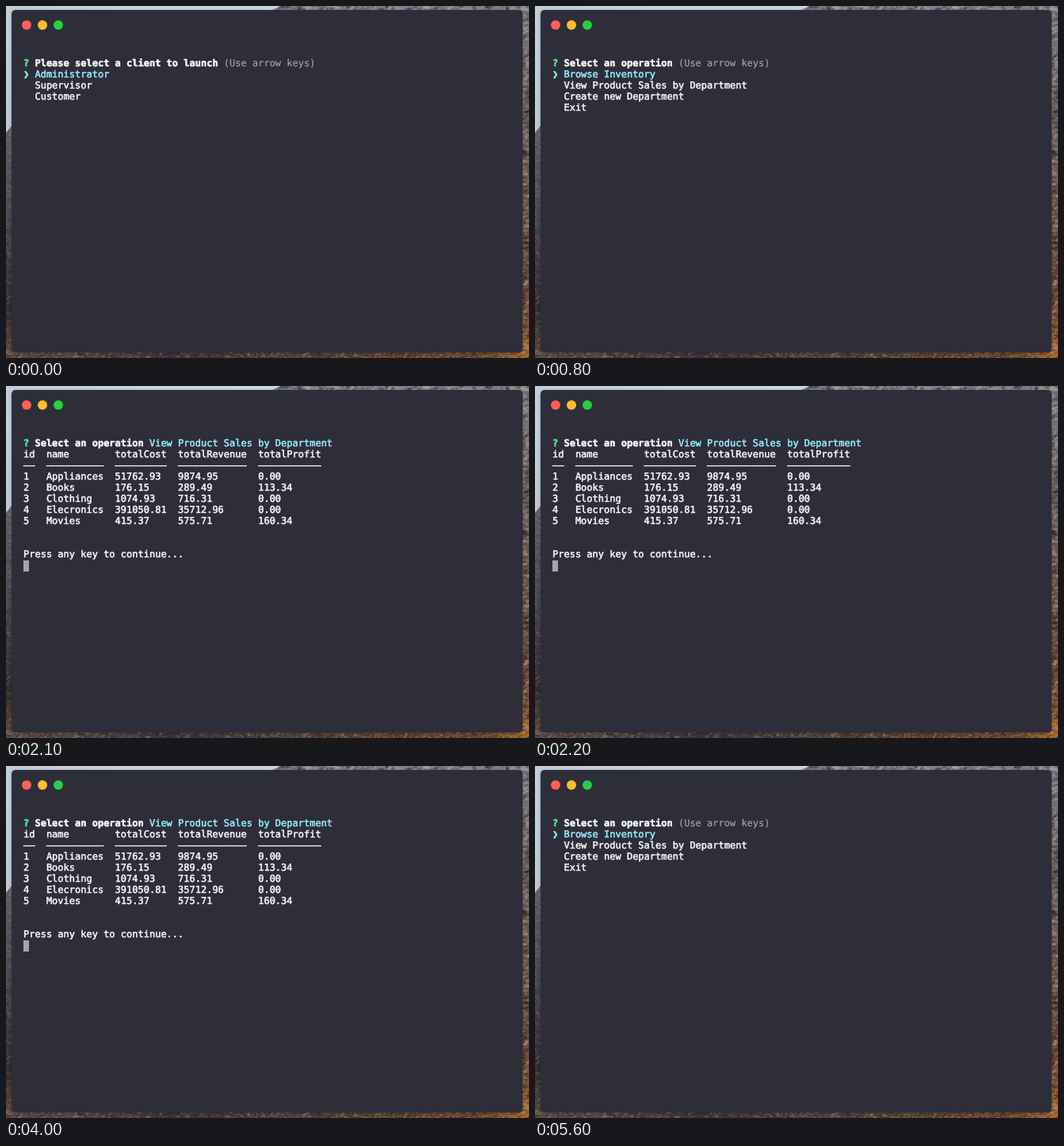
These frames come from a looping animation (660x444 px, 5.7 s). An HTML page with a canvas:

```html
<!DOCTYPE html>
<html lang="en">
<head>
<meta charset="utf-8">
<title>Terminal menu</title>
<style>
  html, body { margin: 0; width: 100%; height: 100%; overflow: hidden; background: #2d2e3a; }
  canvas { display: block; }
</style>
</head>
<body>
<canvas id="stage" width="660" height="444"></canvas>
<script>
const W = 660, H = 444, LOOP = 5700;
const CELL = 7.224, LINE = 14, LEFT = 22, BASE = 76;
const FONT = '12px "DejaVu Sans Mono", monospace';
const WHITE = '#fafafa', CYAN = '#9aedfe', GREEN = '#5af78e', DIM = '#a3a4aa';

const ctx = document.getElementById('stage').getContext('2d');

function random(seed) {
  return () => {
    seed = (seed * 1664525 + 1013904223) >>> 0;
    return seed / 4294967296;
  };
}

function blend(c, x0, y0, x1, y1, stops) {
  const g = c.createLinearGradient(x0, y0, x1, y1);
  stops.forEach(([at, color]) => g.addColorStop(at, color));
  return g;
}

// Slanted flecks of light and shade that give the rock its texture.
function grain(c, x, y, w, h, rnd, size, strength) {
  for (let i = w * h / (size * 2); i > 0; i--) {
    const light = rnd() > 0.5;
    c.fillStyle = `rgba(${light ? '215,195,185' : '15,12,18'},${rnd() * strength})`;
    c.beginPath();
    c.ellipse(x + rnd() * w, y + rnd() * h, size * (0.4 + rnd()), size * 0.35, 0.5 - rnd() * 1.4, 0, Math.PI * 2);
    c.fill();
  }
}

function drawDesktop(c) {
  const rnd = random(11);
  c.fillStyle = blend(c, 0, 0, 340, 0, [[0, '#c3d0d9'], [0.5, '#c8d6e0'], [1, '#ccdae4']]);
  c.fillRect(0, 0, W, H);
  c.fillStyle = blend(c, 0, 0, 0, 160, [[0, '#c3d0d9'], [0.3, '#c6d3dc'], [1, '#c0c9cf']]);
  c.fillRect(0, 5, 8, 160);

  c.save();
  c.beginPath();
  c.moveTo(-1, 161);
  c.lineTo(8, 150);
  c.lineTo(330, 8);
  c.lineTo(346, 0);
  c.lineTo(W, 0);
  c.lineTo(W, H);
  c.lineTo(0, H);
  c.closePath();
  c.clip();
  c.fillStyle = blend(c, 0, 155, 0, H,
    [[0, '#626068'], [0.3, '#54505a'], [0.6, '#3d373c'], [0.8, '#332c2f'], [1, '#5d483e']]);
  c.fillRect(0, 0, 320, H);
  c.fillStyle = blend(c, 0, 0, 0, H,
    [[0, '#7c7f88'], [0.25, '#6a6060'], [0.5, '#68554c'], [0.75, '#5a4235'], [0.88, '#774825'], [1, '#a75f1b']]);
  c.fillRect(320, 0, 340, H);
  c.fillStyle = blend(c, 0, 0, W, 0,
    [[0, '#5f4c43'], [0.3, '#40353a'], [0.6, '#4d3d35'], [0.93, '#6b4629'], [1, '#ad641b']]);
  c.fillRect(0, 435, W, 9);
  grain(c, 0, 150, 8, 290, rnd, 2, 0.18);
  grain(c, 330, 0, 330, 6, rnd, 4, 0.35);
  grain(c, 651, 0, 9, H, rnd, 4, 0.3);
  grain(c, 0, 436, W, 8, rnd, 2.5, 0.25);
  c.restore();
}

function drawWindow(c) {
  c.save();
  c.shadowColor = 'rgba(0,0,0,0.25)';
  c.shadowBlur = 5;
  c.shadowOffsetY = 1;
  c.fillStyle = '#2d2e3a';
  c.beginPath();
  c.roundRect(7, 5, 645, 432, 5);
  c.fill();
  c.restore();
  ['#ff5f57', '#ffbd2e', '#28cf42'].forEach((color, i) => {
    c.fillStyle = color;
    c.beginPath();
    c.arc(26 + i * 20, 24, 6, 0, Math.PI * 2);
    c.fill();
  });
}

const backdrop = document.createElement('canvas');
backdrop.width = W;
backdrop.height = H;
const back = backdrop.getContext('2d');
drawDesktop(back);
drawWindow(back);

// Terminal text sits on a fixed character grid; a thin outline adds weight.
function print(col, row, text, color = WHITE, bold = false) {
  ctx.font = (bold ? 'bold ' : '') + FONT;
  ctx.fillStyle = ctx.strokeStyle = color;
  ctx.lineWidth = color === DIM ? 0.15 : 0.5;
  [...text].forEach((ch, i) => {
    if (ch === ' ') return;
    const x = LEFT + (col + i) * CELL, y = BASE + row * LINE;
    ctx.fillText(ch, x, y);
    ctx.strokeText(ch, x, y);
  });
}

function question(text, tail = '', color = DIM) {
  print(0, 0, '?', GREEN, true);
  print(2, 0, text, WHITE, true);
  print(3 + text.length, 0, tail, color);
}

function menu(title, items, selected, hint) {
  question(title, hint ? '(Use arrow keys)' : '');
  items.forEach((item, i) => {
    const on = i === selected;
    if (on) print(0, i + 1, '❯', CYAN);
    print(2, i + 1, item, on ? CYAN : WHITE);
  });
}

const CLIENTS = ['Administrator', 'Supervisor', 'Customer'];
const ACTIONS = ['Browse Inventory', 'View Product Sales by Department', 'Create new Department', 'Exit'];
const COLUMNS = [0, 4, 16, 27, 41];
const RULES = [2, 10, 9, 12, 11];
const TABLE = [
  'id name totalCost totalRevenue totalProfit',
  RULES.map(n => '—'.repeat(n)).join(' '),
  '1 Appliances 51762.93 9874.95 0.00',
  '2 Books 176.15 289.49 113.34',
  '3 Clothing 1074.93 716.31 0.00',
  '4 Elecronics 391050.81 35712.96 0.00',
  '5 Movies 415.37 575.71 160.34'
];

const clients = (selected, hint) => menu('Please select a client to launch', CLIENTS, selected, hint);
const actions = (selected, hint) => menu('Select an operation', ACTIONS, selected, hint);

function report() {
  question('Select an operation', ACTIONS[1], CYAN);
  TABLE.forEach((line, r) =>
    line.split(' ').forEach((cell, i) => print(COLUMNS[i], r + 1, cell)));
  print(0, 10, 'Press any key to continue...');
  ctx.fillStyle = '#a5a6ac';
  ctx.fillRect(22, 220, 7, 14);
}

const SCENES = [
  [0, () => clients(0, true)],
  [300, () => clients(1, false)],
  [700, () => actions(0, true)],
  [1900, () => actions(1, false)],
  [2100, report],
  [5200, () => actions(0, true)]
];

const start = performance.now();

function frame(now) {
  const t = Math.max(0, now - start) % LOOP;
  ctx.drawImage(backdrop, 0, 0);
  SCENES.filter(([at]) => at <= t).pop()[1]();
  requestAnimationFrame(frame);
}

ctx.textRendering = 'geometricPrecision';
ctx.lineJoin = 'round';
frame(start);
</script>
</body>
</html>
```
